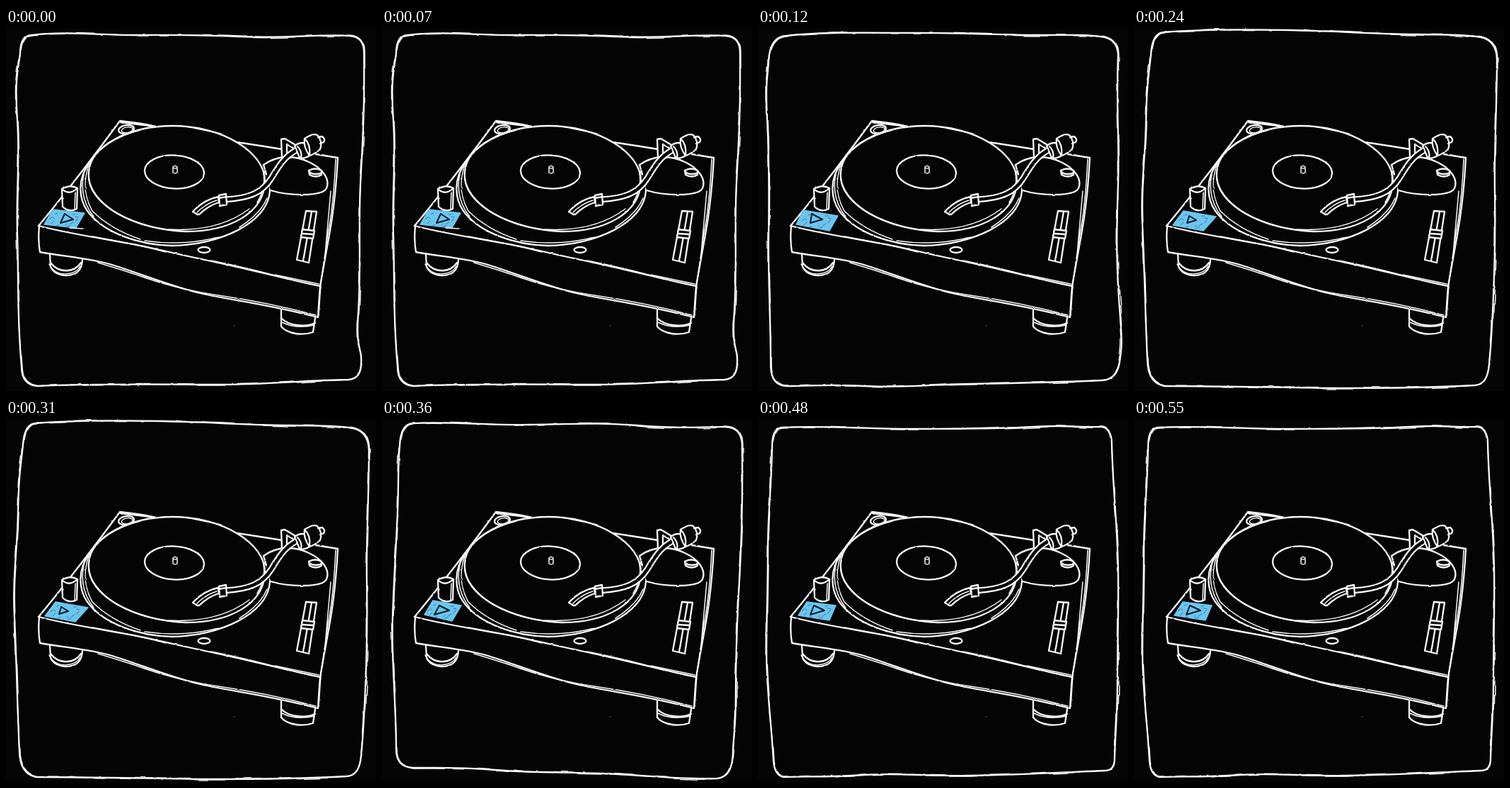
These frames come from a looping animation (523x512 px, 600 ms). An HTML page:

```html
<!DOCTYPE html>
<html lang="en">
<head>
<meta charset="utf-8">
<title>Turntable sketch</title>
<style>
  html, body { margin: 0; width: 100%; height: 100%; overflow: hidden; background: #040404; }
  svg { display: block; width: 523px; height: 512px; }
  .chalk { fill: none; stroke: #f8f8f8; stroke-width: 2.3; stroke-linecap: round; stroke-linejoin: round; }
  .thin { stroke-width: 1.5; }
  .solid { fill: #040404; }
  .pose { visibility: hidden; }
  .pad { fill: #6bc5ee; stroke: #6bc5ee; stroke-width: 1.5; stroke-linejoin: round; }
  .play { fill: none; stroke: #071a24; stroke-width: 2; stroke-linejoin: round; }
  .grain { fill: none; stroke: #123; stroke-width: .7; stroke-linecap: round; opacity: .7; }
</style>
</head>
<body>
<svg viewBox="0 0 523 512">
  <defs>
    <filter id="rough" filterUnits="userSpaceOnUse" x="0" y="0" width="523" height="512" color-interpolation-filters="sRGB">
      <feTurbulence type="fractalNoise" baseFrequency=".13" numOctaves="2" seed="4"/>
      <feDisplacementMap in="SourceGraphic" scale="1.8" xChannelSelector="R" yChannelSelector="G"/>
    </filter>
    <filter id="drift" filterUnits="userSpaceOnUse" x="0" y="0" width="523" height="512" color-interpolation-filters="sRGB">
      <feTurbulence type="fractalNoise" baseFrequency=".022" numOctaves="2" seed="9"/>
      <feDisplacementMap in="SourceGraphic" scale="8" xChannelSelector="R" yChannelSelector="G"/>
    </filter>
    <path id="grain" d="M61 270l4-3M64 276l4-4M70 262l3-1M71 279l4-1M90 277l5-3M98 266l4 1M98 273l3-4M86 280l4-1M94 263l4 0M66 267l2 2M84 278l2-2"/>
  </defs>
  <rect width="523" height="512" fill="#040404"/>
  <circle cx="323" cy="420" r=".8" fill="#777"/>

  <g class="chalk" filter="url(#rough)">
    <!-- deck -->
    <path d="M46 279Q100 214 161 131Q190 134 213 139M162 133L205 138M326 161Q360 166 390 171M438 178L469 183Q466 240 458 286L444 364"/>
    <path class="thin" d="M48 277Q108 203 159 134M265 141L304 149M466 185Q463 250 455 290L445 360M459 230L451 320"/>
    <path d="M46 279C100 293 160 300 200 309S270 325 300 331S400 355 444 364"/>
    <path class="thin" d="M122 294Q180 304 226 316M290 328Q350 340 398 354M380 348L442 361"/>
    <path d="M47 279Q45 300 48 316C80 322 120 325 150 334S230 363 270 373S360 387 441 408M444 364Q442 390 441 408"/>
    <path class="thin" d="M130 331Q180 346 214 358M176 345Q240 369 306 378M300 377Q370 387 438 405M445 362L442 405"/>
    <!-- feet -->
    <path d="M62 319L63 337C68 348 84 352 96 347Q107 343 108 327M63 331C74 346 96 346 106 331"/>
    <path class="thin" d="M61 333Q68 347 84 347Q100 346 105 336"/>
    <path d="M389 398L389 421C398 432 420 434 434 429L437 409M389 409C400 421 424 422 437 416"/>
    <path class="thin" d="M390 415Q410 425 436 419"/>
    <!-- platter -->
    <path d="M119 189C102 210 100 240 118 262C140 288 185 306 235 307C300 306 370 276 373 230Q374 214 366 203"/>
    <path class="thin" d="M117 193C108 220 112 240 122 258Q148 284 190 298M110 206Q103 240 124 266M196 300Q250 308 300 295M330 281Q360 262 369 240"/>
    <path d="M117 203C120 165 175 138 236 138C305 138 367 175 366 217C364 262 315 287 255 287C185 285 112 250 117 203Z"/>
    <path class="thin" d="M117 210C120 245 170 280 240 286M118 192Q136 158 190 144M230 284Q300 288 344 255M362 196Q370 222 355 246"/>
    <ellipse cx="238" cy="203" rx="42" ry="23.5" transform="rotate(3 238 203)"/>
    <path class="thin" d="M236 196Q239 193 242 196L242 204Q239 206 236 204ZM236 197Q239 199 242 197"/>
    <!-- controls -->
    <g transform="rotate(-10 170 143)"><ellipse cx="170" cy="143" rx="11" ry="6"/><ellipse class="thin" cx="171" cy="144" rx="8" ry="4"/></g>
    <ellipse cx="280" cy="313" rx="8.5" ry="4"/>
    <path class="solid" d="M79 227L80 252Q89 261 100 255L101 226Q91 220 79 227Z"/>
    <path d="M79 227Q89 237 101 226"/>
    <path class="thin" d="M98 232L97 255"/>
    <path d="M424 258L439 259L428 331L411 327ZM432 259L420 329"/>
    <path class="solid" d="M419 284L436 286L434 297L417 295Z"/>
    <path d="M419 290L434 291"/>
    <!-- tonearm -->
    <path class="solid" d="M364 193C385 178 410 180 428 189C450 199 458 215 453 226C447 238 400 237 374 229"/>
    <path d="M364 193L368 206M428 201Q437 196 446 201Q448 206 438 206Q429 206 428 201L429 207Q438 212 446 207L446 202"/>
    <path class="solid" d="M390 183L389 157L394 156L411 166M397 182L397 164L407 170M390 182L402 183"/>
    <path d="M310 242C345 240 362 232 375 212C388 190 398 176 418 169" stroke-width="9"/>
    <path d="M308 242C345 240 362 232 375 212C388 190 398 176 420 168" stroke="#040404" stroke-width="4.6"/>
    <path class="solid" d="M264 259Q280 242 300 238L301 246Q285 251 272 264Z"/>
    <path class="thin" d="M270 260Q282 248 298 243"/>
    <path class="solid" d="M301 236L311 234L312 249L302 251ZM300 240L312 238"/>
    <path class="solid" d="M408 166Q416 160 424 163L429 180Q421 185 415 183Z"/>
    <path class="solid" d="M422 156Q434 148 440 151Q448 160 444 171Q436 178 429 180Q420 168 422 156Z"/>
    <path d="M422 156Q431 164 429 180M441 154L447 153Q452 157 449 161L444 163M412 167Q419 174 417 183"/>
  </g>

  <g class="pose">
    <path class="edge" d="M37 10C80 4 130 10 180 10S260 9 330 12S450 8 485 11Q506 12 506 34C507 120 504 160 501 220S502 340 498 400S504 450 502 472Q502 495 484 496C420 497 370 503 300 503S130 501 44 505Q22 503 22 478C15 400 18 350 16 290S20 190 16 130S17 60 20 36Q20 10 37 10Z"/>
    <path class="pad" d="M66 256L111 261L99 282L54 277Z"/>
    <use href="#grain" class="grain"/>
    <path class="play" d="M83 262L95 270L77 275Z"/>
    <path class="chalk thin" d="M90 282L109 283"/>
  </g>
  <g class="pose">
    <path class="edge" d="M40 11C90 5 160 7 230 7S340 10 400 10S460 9 484 12Q508 14 509 38C506 110 511 160 509 220S506 320 510 380S516 440 511 472Q507 496 486 497C420 500 360 501 300 502S200 508 150 505S80 505 40 505Q19 504 18 478C18 410 14 350 15 290S16 190 13 130S14 70 15 46Q17 12 40 11Z"/>
    <path class="pad" d="M64 257L113 265L101 286L54 277Z"/>
    <use href="#grain" class="grain" transform="translate(1 2)"/>
    <path class="play" d="M76 262L91 270L74 275Z"/>
  </g>
  <g class="pose">
    <path class="edge" d="M42 6C90 2 160 2 220 3S330 8 400 9S450 9 484 12Q512 14 513 44C513 110 509 170 510 230S510 340 507 400S504 450 502 474Q500 503 482 504C420 507 360 508 300 508S130 505 42 505Q20 500 19 470C16 410 15 340 12 280S16 190 17 130S21 70 24 36Q26 7 42 6Z"/>
    <path class="pad" d="M70 258L116 266L98 286L55 278Z"/>
    <use href="#grain" class="grain" transform="translate(2 2)"/>
    <path class="play solid" d="M78 265L88 271L75 275Z"/>
  </g>
  <g class="pose">
    <path class="edge" d="M44 6C90 3 150 9 210 8S310 5 360 9S440 12 484 11Q508 11 509 36C510 110 508 180 505 230S500 340 500 390S497 440 496 472Q495 505 474 507C420 509 370 502 310 500S210 499 160 495S90 492 44 492Q20 491 20 466C20 400 13 340 15 280S20 180 22 130S22 70 25 38Q26 7 44 6Z"/>
    <path class="pad" d="M72 256L112 263L99 285L60 276Z"/>
    <use href="#grain" class="grain" transform="translate(3 1)"/>
    <path class="play" d="M81 263L95 270L74 276Z"/>
  </g>
  <g class="pose">
    <path class="edge" d="M34 12C90 9 150 14 220 14S340 14 390 11S450 12 485 11Q498 11 500 32C501 90 508 150 509 210S508 320 508 370S505 440 504 480Q504 496 490 496C420 499 360 502 300 503S200 499 150 502S80 504 36 505Q24 503 22 484C18 419 12 380 12 330S14 230 14 180S19 100 20 38Q20 13 34 12Z"/>
    <path class="pad" d="M69 258L110 263L101 284L57 277Z"/>
    <use href="#grain" class="grain" transform="translate(1 1)"/>
    <path class="play" d="M79 263L94 270L74 276Z"/>
  </g>
</svg>
<script>
  const STEP = 120;
  const poses = [...document.querySelectorAll('.pose')];

  // Each border gets a firm stroke and a wandering lighter one.
  for (const edge of document.querySelectorAll('.edge')) {
    const ghost = edge.cloneNode();
    edge.setAttribute('class', 'chalk');
    edge.setAttribute('filter', 'url(#rough)');
    ghost.setAttribute('class', 'chalk thin');
    ghost.setAttribute('filter', 'url(#drift)');
    edge.after(ghost);
  }

  function show(ms) {
    const now = Math.floor(ms / STEP) % poses.length;
    poses.forEach((pose, i) => { pose.style.visibility = i === now ? 'visible' : 'hidden'; });
  }

  function tick() {
    show(performance.now());
    requestAnimationFrame(tick);
  }
  tick();
</script>
</body>
</html>
```
